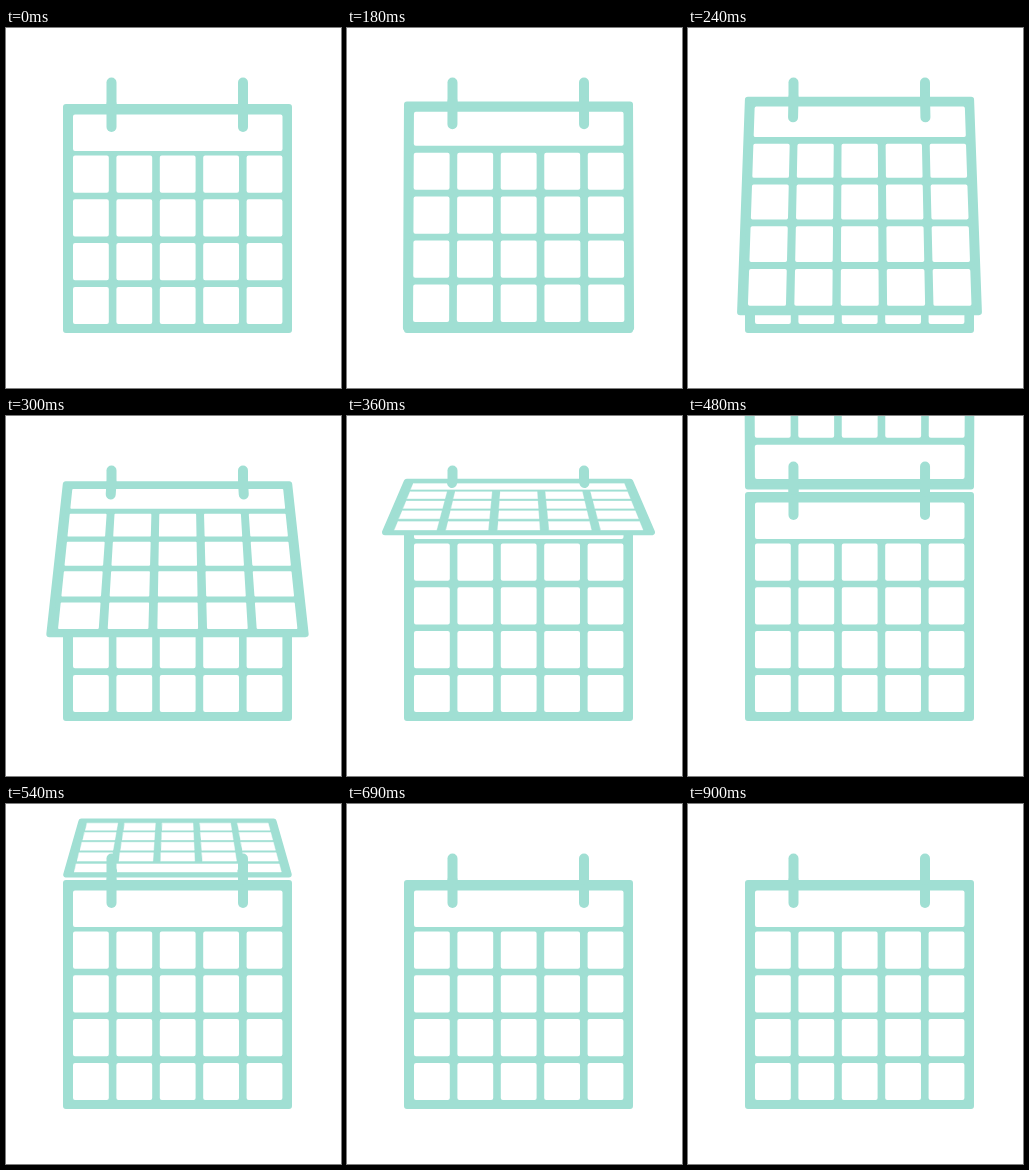
These frames come from a looping animation (335 px wide and 360 px high, 930 ms). An HTML page with a canvas:

```html
<!DOCTYPE html>
<html lang="en">
<head>
<meta charset="utf-8">
<title>Calendar flip</title>
<style>
html, body { margin: 0; height: 100%; overflow: hidden; background: #fff; }
canvas { display: block; }
</style>
</head>
<body>
<canvas id="stage" width="335" height="360"></canvas>
<script>
const ctx = document.getElementById('stage').getContext('2d');
const TEAL = '#a0dfd3', WHITE = '#fff';
const LOOP = 930, SIZE = 229, CENTER_X = 171.5, HINGE_Y = 76;
const EYE_Y = 115, EYE_DISTANCE = 1320;
const RINGS = [-66, 65.5];

// Page angle in degrees, one key every STEP ms, starting at -60 ms.
const STEP = 120, ANGLES = [0, 0, 3, 49, 110, 248, 360, 360];

function angleAt(ms) {
  const pos = (ms + 60) / STEP;
  const i = Math.floor(pos), u = pos - i;
  const key = k => ANGLES[Math.max(0, Math.min(ANGLES.length - 1, k))];
  const [a, b, c, d] = [key(i - 1), key(i), key(i + 1), key(i + 2)];
  const deg = b + u / 2 * (c - a + u * (2 * a - 5 * b + 4 * c - d + u * (3 * (b - c) + d - a)));
  return Math.max(0, Math.min(360, deg)) * Math.PI / 180;
}

// Maps a point on the page (x from its middle, y from the hinge) to the stage.
function projector(angle) {
  const sin = Math.sin(angle), cos = Math.cos(angle);
  const lift = sin > 0 ? 11 * Math.sqrt(sin) : -5 * sin;
  return (x, y) => {
    const scale = EYE_DISTANCE / (EYE_DISTANCE - y * sin);
    return [CENTER_X + x * scale, HINGE_Y - lift + EYE_Y + (y * cos - EYE_Y) * scale];
  };
}

function line(points, width) {
  ctx.beginPath();
  points.forEach(p => ctx.lineTo(...p));
  ctx.lineWidth = width;
  ctx.stroke();
}

function drawPage(angle, headerHeight) {
  const project = projector(angle);
  const flat = Math.max(0.02, Math.abs(Math.cos(angle)));

  // The round outline makes up for the inset.
  function box(x, y, w, h, inset, round, color) {
    const l = x + round, r = x + w - round, t = y + inset, b = y + h - inset;
    ctx.beginPath();
    [[l, t], [r, t], [r, b], [l, b]].forEach(p => ctx.lineTo(...project(...p)));
    ctx.closePath();
    ctx.fillStyle = ctx.strokeStyle = color;
    ctx.lineWidth = 2 * round;
    ctx.fill();
    ctx.stroke();
  }
  const hole = (x, y, w, h) => box(x, y, w, h, 2, 2 * flat * flat, WHITE);

  box(-SIZE / 2, 0, SIZE, SIZE, 3, 3, TEAL);
  hole(-104.5, 10.5, 209.5, headerHeight);
  for (let row = 0; row < 4; row++)
    for (let col = 0; col < 5; col++)
      hole(-104.5 + 43.4 * col, 51.5 + 43.8 * row, 35.8, 37.2);

  ctx.strokeStyle = TEAL;
  const end = Math.max(0, 28 - 5 / flat);
  for (const x of RINGS) line([project(x, 0), project(x, end)], 10);
}

function drawBase() {
  drawPage(0, 36.5);
  for (const x of RINGS)
    line([[CENTER_X + x, 54.5], [CENTER_X + x, HINGE_Y]], 10);
}

function frame() {
  const angle = angleAt(performance.now() % LOOP);
  ctx.fillStyle = WHITE;
  ctx.fillRect(0, 0, 335, 360);
  ctx.lineCap = ctx.lineJoin = 'round';
  const inFront = angle < Math.PI;
  if (!inFront && angle < 1.5 * Math.PI) drawPage(angle, 34);
  drawBase();
  if (inFront && angle > 0) drawPage(angle, 34);
  requestAnimationFrame(frame);
}
frame();
</script>
</body>
</html>
```
